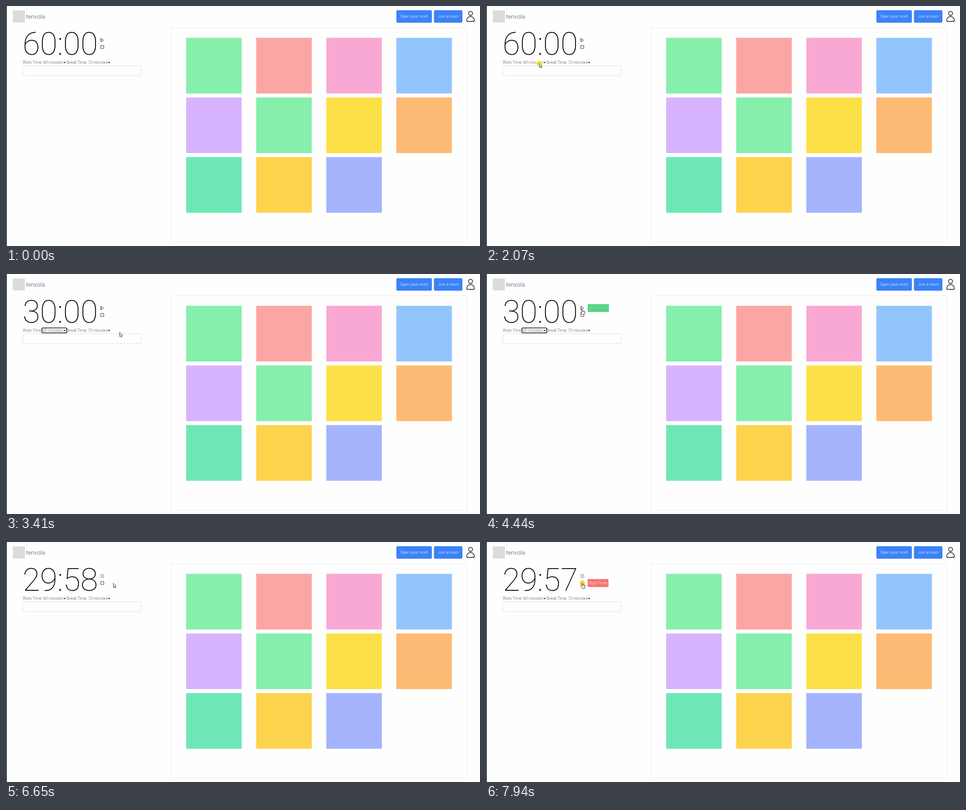
Animation, 1053 px wide and 532 px high, one loop 8 s. Source, as an HTML page with a canvas:

```html
<!DOCTYPE html>
<html lang="en">
<head>
<meta charset="utf-8">
<title>Study room timer</title>
<style>
  html, body { margin: 0; width: 100%; height: 100%; overflow: hidden; background: #fefefe; }
  canvas { display: block; width: 1053px; height: 532px; }
</style>
</head>
<body>
<canvas id="stage"></canvas>
<script>
const W = 1053, H = 532, LOOP = 8000;
const canvas = document.getElementById('stage');
const ctx = canvas.getContext('2d');
const dpr = window.devicePixelRatio || 1;
canvas.width = W * dpr;
canvas.height = H * dpr;

const REM = 8.82;
const INK = '#505050';
const GREEN = '#86efac';
const CARDS = [GREEN, '#fca5a5', '#f9a8d4', '#93c5fd', '#d8b4fe', GREEN,
               '#fde047', '#fdba74', '#6ee7b7', '#fcd34d', '#a5b4fc'];

const STEP = 70;
const OPEN = 2070, PICK = 2720, START = 4580, STOP = 7870;
const CLICKS = [OPEN, PICK, START, STOP];
const ENTRY = { x: 1010, y: 545 };

// Each move begins where the one before it ended.
const MOVES = [
  { from: 200, to: 970, x: 114, y: 111 },
  { from: 1040, to: 1110, x: 105, y: 119 },
  { from: 1310, to: 1520, x: 160, y: 92 },
  { from: 1590, to: 1800, x: 118.5, y: 127 },
  { from: 2200, to: 2480, x: 119, y: 138 },
  { from: 3080, to: 3360, x: 252.5, y: 129.5 },
  { from: 3480, to: 3830, x: 376, y: 119, bend: 1.2 },
  { from: 3900, to: 4390, x: 213.5, y: 78 },
  { from: 4720, to: 5000, x: 238.5, y: 91.5 },
  { from: 7200, to: 7550, x: 214, y: 91 }
];

const ramp = (t, a, b) => Math.max(0, Math.min(1, (t - a) / (b - a)));
const within = (t, a, b) => t >= a && t < b;
const easeOut = (u) => u * (2 - u);

// Arc from a to b; bend pushes the middle sideways.
function arc(a, b, u) {
  const dx = b.x - a.x, dy = b.y - a.y;
  const side = 2 * u * (1 - u) * (b.bend || 0);
  return { x: a.x + dx * u - dy * side, y: a.y + dy * u + dx * side };
}

function pointer(t) {
  const i = MOVES.findLastIndex((m) => t >= m.from);
  if (i < 0) return null;
  const move = MOVES[i];
  const steps = Math.round((move.to - move.from) / STEP) + 1;
  const k = Math.min(steps, Math.floor((t - move.from) / STEP) + 1);
  return arc(MOVES[i - 1] || ENTRY, move, easeOut(k / steps));
}

function clock(t) {
  const elapsed = Math.max(0, Math.floor((t - START - STEP) / 1000));
  const left = (t < PICK ? 60 : 30) * 60 - elapsed;
  const pad = (n) => String(n).padStart(2, '0');
  return pad(Math.floor(left / 60)) + ':' + pad(left % 60);
}

function text(str, x, y, color = INK, size = REM, weight = 300) {
  ctx.font = `${weight} ${size}px Roboto, sans-serif`;
  ctx.fillStyle = color;
  ctx.fillText(str, x, y);
}

function box(x, y, w, h, color) {
  ctx.fillStyle = color;
  ctx.fillRect(x, y, w, h);
}

function paint(fill, line, width = 1) {
  if (fill) { ctx.fillStyle = fill; ctx.fill(); }
  if (line) { ctx.strokeStyle = line; ctx.lineWidth = width; ctx.stroke(); }
}

function round(x, y, w, h, r, fill, line, width) {
  ctx.beginPath();
  ctx.roundRect(x, y, w, h, r);
  paint(fill, line, width);
}

function circle(x, y, r, fill, line, width) {
  ctx.beginPath();
  ctx.arc(x, y, r, 0, Math.PI * 2);
  paint(fill, line, width);
}

function poly(pts, fill, line, width) {
  ctx.beginPath();
  pts.forEach(([x, y]) => ctx.lineTo(x, y));
  if (fill) ctx.closePath();
  paint(fill, line, width);
}

function button(label, x, w) {
  round(x, 9.3, w, 27.7, 3, '#3b82f6');
  text(label, x + 8.8, 26, '#fff');
}

function header() {
  box(0, 0, 1.6, H, '#111');
  box(15, 10, 27, 26.5, '#dcdcdc');
  text('tenvola', 44.5, 27.5, '#465066', REM * 1.5);
  button('Open your room', 867.2, 78.8);
  button('Join a room', 950.7, 63.2);
  circle(1032, 16.3, 4.5, null, '#111', 1.4);
  round(1023.5, 23.3, 17, 11, [8.5, 8.5, 2.5, 2.5], null, '#111', 1.4);
}

function board() {
  round(366.5, 48.5, 657.5, 475.5, 0, null, '#e8e9eb');
  CARDS.forEach((color, i) => {
    box(400.2 + (i % 4) * 155.65, 70.5 + Math.floor(i / 4) * 132.2, 123.4, 123.4, color);
  });
}

function select(value, x, arrowX) {
  text(value, x, 128);
  poly([[arrowX - 2, 124], [arrowX, 126], [arrowX + 2, 124]], null, '#111', 1.3);
}

function timer(t) {
  text(clock(t), 37, 108, '#000', REM * 8, 100);

  if (t < START) {
    poly([[211, 71.6], [217, 75.6], [211, 79.6]], '#fefefe', '#3d2b2b', 0.9);
    poly([[211, 71.6], [211, 79.6]], null, '#3d2b2b', 0.9);
  } else {
    for (const x of [210.5, 215]) round(x, 71.5, 2.4, 7.6, 0, null, '#8d7f98', 0.8);
  }
  round(210.5, 87.5, 6.7, 6.7, 0, null, '#7d3236', 1.1);

  select('Work Time: 60 minutes', 37, 130);
  select('Break Time: 15 minutes', 134.7, 229);
  round(37.5, 132.2, 263.5, 22.3, 4, '#fefefe', '#dcdee2');

  if (within(t, OPEN + STEP, START)) {
    round(79.9, 119.4, 55, 11.2, 1.8, '#fff', '#111', 1.5);
    select('60 minutes', 81.7, 130);
  }
}

function menu(t) {
  if (!within(t, OPEN + STEP, PICK)) return;
  const row = 11.2, chosen = t < 2410 ? 60 : 30;
  round(79.5, 131.5, 55.5, 3 * row + 1, 0, '#fff', '#777', 0.8);
  for (let i = 0; i < 3; i++) {
    const minutes = 30 + 15 * i, y = 132 + i * row;
    const on = minutes === chosen;
    if (on) box(80, y, 54.5, row, '#1967d2');
    text(minutes + ' minutes', 81.7, y + 8.6, on ? '#fff' : INK);
  }
}

function tip(label, y, w, color, alpha, ink) {
  ctx.globalAlpha = alpha;
  box(226, y, w, 17.5, color);
  ctx.globalAlpha = ink;
  text(label, 228, y + 11.6, '#fff');
  ctx.globalAlpha = 1;
}

function tips(t) {
  if (t < START) tip('Start Timer', 66.7, 47, '#56d387', ramp(t, 4300, 4440), ramp(t, 4400, 4560));
  const shown = ramp(t, 7500, 7700);
  tip('Stop Timer', 82.2, 46, '#f87171', shown, shown);
}

function arrow() {
  poly([[0, 0], [0, 9], [2, 7.2], [3.5, 10.6], [5, 9.9], [3.5, 6.6], [6.2, 6.4]],
    '#fff', '#222', 0.9);
}

function hand() {
  poly([[-1, 7], [-3, 6], [0, 11.8], [5.4, 11.8], [6.4, 5.4], [1, 3.6]], '#fff', '#222', 0.9);
  round(-1, -0.6, 2, 8, 1, '#fff', '#222', 0.8);
  box(-0.6, 5.5, 3, 3, '#fff');
  for (const x of [2.8, 4.6]) poly([[x, 4.3], [x, 6.4]], null, '#222', 0.7);
}

function cursor(t) {
  const pos = pointer(t);
  if (!pos) return;
  ctx.translate(pos.x, pos.y);
  if (CLICKS.some((c) => within(t, c - STEP, c + STEP) || (c === STOP && t >= c))) {
    circle(0, 0.5, 6.4, 'rgba(255, 236, 0, 0.75)');
  }
  const pointing = within(t, 4320, 4720) || t >= 7480;
  (pointing ? hand : arrow)();
}

function draw(t) {
  ctx.setTransform(dpr, 0, 0, dpr, 0, 0);
  box(0, 0, W, H, '#fefefe');
  header();
  board();
  timer(t);
  menu(t);
  tips(t);
  cursor(t);
}

let origin = null;
function tick(now) {
  origin ??= now;
  draw((now - origin) % LOOP);
  requestAnimationFrame(tick);
}
requestAnimationFrame(tick);
</script>
</body>
</html>
```
